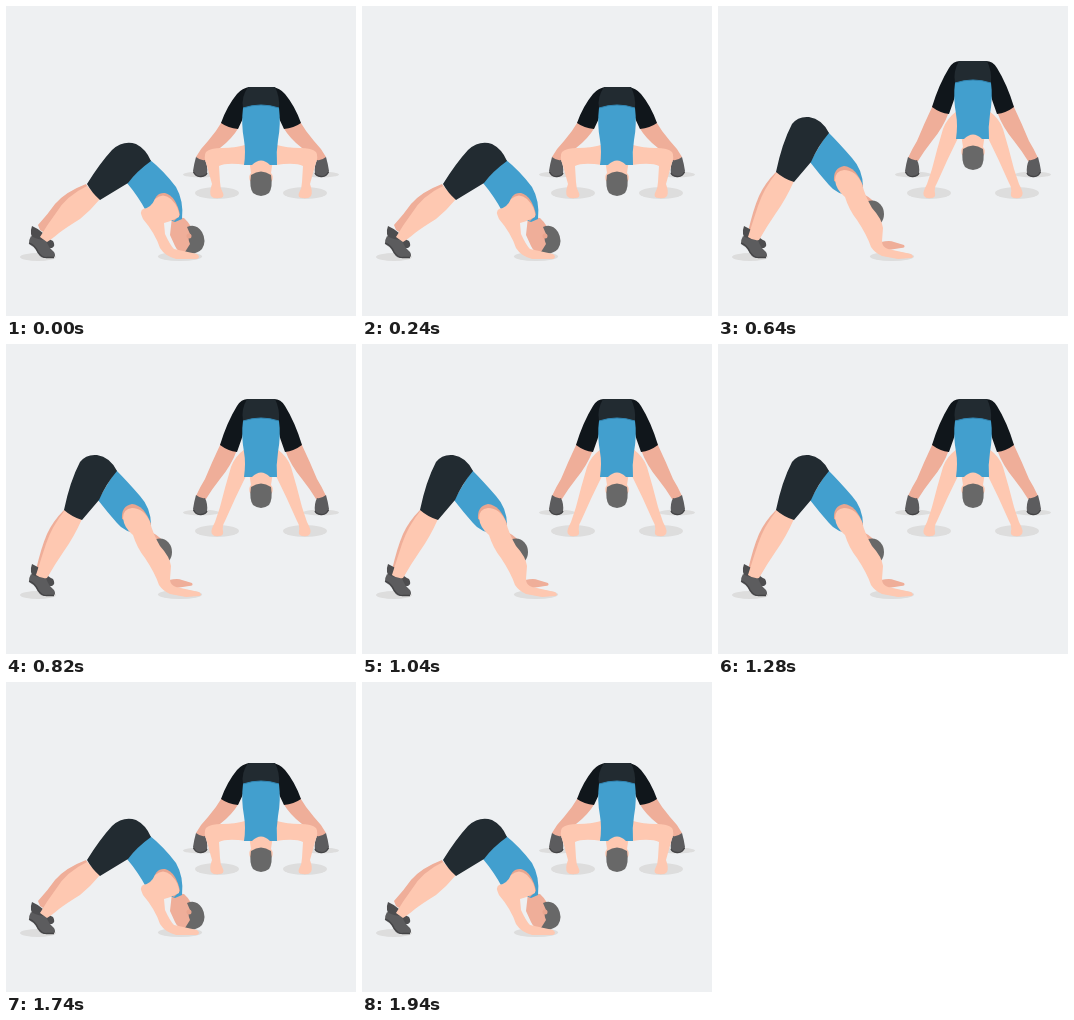
Recreate the animation shown at these times as an HTML page. Size 350x310 px, loop 1.98 s.

```html
<!DOCTYPE html>
<html lang="en">
<meta charset="utf-8">
<title>Dolphin push-up</title>
<style>
html, body { margin: 0; width: 100%; height: 100%; overflow: hidden; background: #eef0f2 }
svg { display: block; width: 350px; height: 310px }
.shadow { fill: #dddddd }
.skin { fill: #fec8b1 }
.far { fill: #efae99 }
.rim { fill: #e9a58f }
.shirt { fill: #429fce }
.hem { fill: none; stroke: #3287b5 }
.shorts { fill: #222b31 }
.dark { fill: #10161b }
.hair { fill: #686868 }
.shoe { fill: #5c5c5e }
.farshoe { fill: #4d4d4f }
.sole { fill: none; stroke: #444446; stroke-width: 1.3 }
</style>
<svg viewBox="0 0 350 310">
  <defs>
    <g id="frontFoot">
      <path class="shoe" d="M190 151Q195 155 199 154Q202 160 201 167Q199 171 194 171Q188 170 187 165Q188 158 190 151Z"/>
      <path class="sole" d="M187.500 166Q190 171 195 170.500Q200 170 201 167"/>
    </g>
    <g id="upSide">
      <path class="far" d="M215 99L231 106Q225 122 214 135Q206 145 200 155Q194 156 190 152Q194 143 199 135Q206 118 215 99Z"/>
      <use href="#frontFoot"/>
      <path class="dark" d="M256 55H242Q235 55 231 62Q221 78 214 101Q222 107 231 108Q236 95 239 83L256 80Z"/>
      <path class="skin" d="M239 105Q229 112 225 123Q219 143 214 163L209 178Q204 187 206 190Q208 193 213 192Q218 192 217 187Q216 182 219 177Q229 154 240 132Z"/>
    </g>
    <g id="downSide">
      <path class="far" d="M217 114L233 121Q226 133 214 142Q206 147 200 155Q194 156 190 151Q195 142 202 135Q210 126 217 114Z"/>
      <use href="#frontFoot"/>
      <path class="dark" d="M256 81H244Q236 82 231 88Q221 100 215 117Q222 122 232 123Q237 114 239 105L256 104Z"/>
      <path class="skin" d="M239 139Q229 142 216 142Q204 142 200 146Q197 150 201 160L206 178Q203 186 205 190Q207 193 213 192Q219 192 217 187Q214 182 214 176L213 160Q221 156 240 159Z"/>
    </g>
    <g id="shoes">
      <path class="farshoe" d="M26 220Q31 222 37 227Q42 233 47 235Q50 240 46 242H39L28 234Q23 228 26 220Z"/>
      <path class="shoe" d="M25 230Q32 234 40 234Q42 241 48 246Q51 251 46 252H38Q33 251 30 244Q27 240 23 238Q23 233 25 230Z"/>
      <path class="sole" d="M23 237Q29 239 32 246Q36 252 41 251.500H48"/>
    </g>
  </defs>

  <g class="shadow">
    <ellipse cx="32" cy="251" rx="18" ry="4"/>
    <ellipse cx="174" cy="250.500" rx="22" ry="4.500"/>
    <ellipse cx="211" cy="187" rx="22" ry="6"/>
    <ellipse cx="299" cy="187" rx="22" ry="6"/>
    <ellipse cx="195" cy="168.500" rx="18" ry="3"/>
    <ellipse cx="315" cy="168.500" rx="18" ry="3"/>
  </g>

  <g id="up">
    <path class="far" d="M58 166L70 172L42 232L30 226Q35 204 41 190Q47 177 58 166Z"/>
    <use href="#shoes"/>
    <path class="skin" d="M59 166L76 175Q68 193 58 207Q49 220 41 234Q35 235 30 231Q35 215 40 200Q46 182 59 166Z"/>
    <path class="far" d="M150 220L163 236Q172 234 176 236L186 239Q188 242 183 242L164 245Z"/>
    <path class="far" d="M141 186Q151 190 157 197L158 219Q150 220 146 210Z"/>
    <ellipse class="hair" cx="154" cy="208" rx="12" ry="13.500"/>
    <path class="shirt" d="M110 126Q121 137 134 152Q145 164 145 181L133 189Q119 189 111 179Q102 169 92 156Z"/>
    <path class="shorts" d="M74 118Q80 110 91 111Q104 113 111 127Q100 140 93 156L76 176Q66 173 58 166Q64 137 74 118Z"/>
    <path class="rim" d="M116 175Q115 162 126 160Q138 161 145 180L140 186Z"/>
    <path class="skin" d="M117 174Q117 165 126 164Q138 164 144 178Q147 190 154 202Q164 213 165 222L164 235Q164 241 170 243L193 248Q197 251 193 252L180 253L164 250Q157 247 153 241Q149 229 139 214Q131 204 127 191Q118 184 117 174Z"/>

    <use href="#upSide"/>
    <use href="#upSide" transform="matrix(-1 0 0 1 510 0)"/>
    <path class="shorts" d="M241 55H269Q274 65 273 77H237Q235 65 241 55Z"/>
    <path class="skin" d="M243 128H267L265 141Q268 144 266 149H244Q242 144 245 141Z"/>
    <path class="shirt" d="M237 77Q255 71 273 77Q275 91 272 108Q270 121 271 133H264Q255 124 246 133H238Q240 119 238 108Q235 91 237 77Z"/>
    <path class="hem" d="M237 77Q255 71 273 77"/>
    <path class="hair" d="M245 143Q255 136 265 143Q267 155 263 161Q255 167 247 161Q243 155 245 143Z"/>
  </g>

  <g id="down">
    <path class="far" d="M80 178L86 188L45 231L34 224L32 219Q42 208 49 198Q59 186 80 178Z"/>
    <use href="#shoes"/>
    <path class="skin" d="M81 180L94 193Q85 204 74 213Q61 221 53 227Q46 233 41 236L34 231Q41 219 50 207Q60 190 81 180Z"/>
    <path class="far" d="M166 211L178 212Q187 220 188 231L183 245Q173 249 169 240L164 229Z"/>
    <path class="hair" d="M181 221Q190 217 196 226Q201 235 196 243Q189 250 179 246L184 238Q181 231 184 228Z"/>
    <circle class="rim" cx="183" cy="230" r="2.500"/>
    <path class="shirt" d="M143 153Q158 165 170 181Q178 195 176 213L169 216L140 205Q132 190 121 177Z"/>
    <path class="shorts" d="M81 178Q94 157 106 144Q117 134 130 138Q140 143 145 155Q131 165 122 177L94 194Q86 187 81 178Z"/>
    <path class="rim" d="M147 200Q149 186 159 187Q170 190 174 209L168 215Z"/>
    <path class="skin" d="M149 193Q157 186 165 193Q174 202 173 211Q166 215 158 217L159 228Q164 239 168 243L191 248Q195 251 191 253H170Q159 250 154 242Q149 227 137 213Q133 205 137 203Q145 202 149 193Z"/>

    <use href="#downSide"/>
    <use href="#downSide" transform="matrix(-1 0 0 1 510 0)"/>
    <path class="shorts" d="M242 81H269Q274 91 273 102H237Q235 91 242 81Z"/>
    <path class="skin" d="M243 153H267L265 167Q268 170 266 175H244Q242 170 245 167Z"/>
    <path class="shirt" d="M237 102Q255 96 273 102Q275 118 272 134Q270 146 271 159H264Q255 150 246 159H238Q240 146 238 134Q235 118 237 102Z"/>
    <path class="hem" d="M237 102Q255 96 273 102"/>
    <path class="hair" d="M245 169Q255 162 265 169Q267 181 263 187Q255 193 247 187Q243 181 245 169Z"/>
  </g>
</svg>
<script>
const LOOP = 1980, RISE = 370, DROP = 1360;
const up = document.getElementById("up"), down = document.getElementById("down");
const start = performance.now();

function draw(now) {
  const t = Math.max(0, now - start) % LOOP;
  const raised = t >= RISE && t < DROP;
  up.style.display = raised ? "" : "none";
  down.style.display = raised ? "none" : "";
  requestAnimationFrame(draw);
}
draw(start);
</script>
</html>
```
